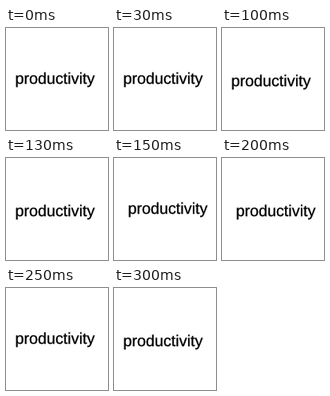
An HTML page for the animation above (0.35 s loop, 128 px wide and 128 px high).

```html
<!DOCTYPE html>
<html lang="en">
<head>
<meta charset="utf-8">
<title>Shaking word</title>
<style>
  html, body { margin: 0; width: 100%; height: 100%; overflow: hidden; background: #fff; }
  svg { display: block; width: 100vw; height: 100vh; }
  text {
    font: 19.8px "Liberation Sans", Arial, sans-serif;
    text-rendering: geometricPrecision;
    fill: #000;
    stroke: #000;
    stroke-width: 0.3px;
  }
</style>
</head>
<body>
<svg viewBox="0 0 128 128"><text id="word" x="11.4" y="70">productivity</text></svg>
<script>
  const STEP = 50;
  const LEFT = 11.4, RIGHT = 17.4, HIGH = 70, LOW = 73;
  // The word jumps between the corners of a small box.
  const jumps = [
    [LEFT, HIGH], [RIGHT, LOW], [LEFT, LOW], [RIGHT, HIGH],
    [RIGHT, LOW], [LEFT, HIGH], [LEFT, LOW]
  ];
  const word = document.getElementById("word");
  const start = performance.now();

  function draw(now) {
    const t = Math.max(0, now - start);
    const [x, y] = jumps[Math.floor(t / STEP) % jumps.length];
    word.setAttribute("x", x);
    word.setAttribute("y", y);
    requestAnimationFrame(draw);
  }
  draw(start);
</script>
</body>
</html>
```
